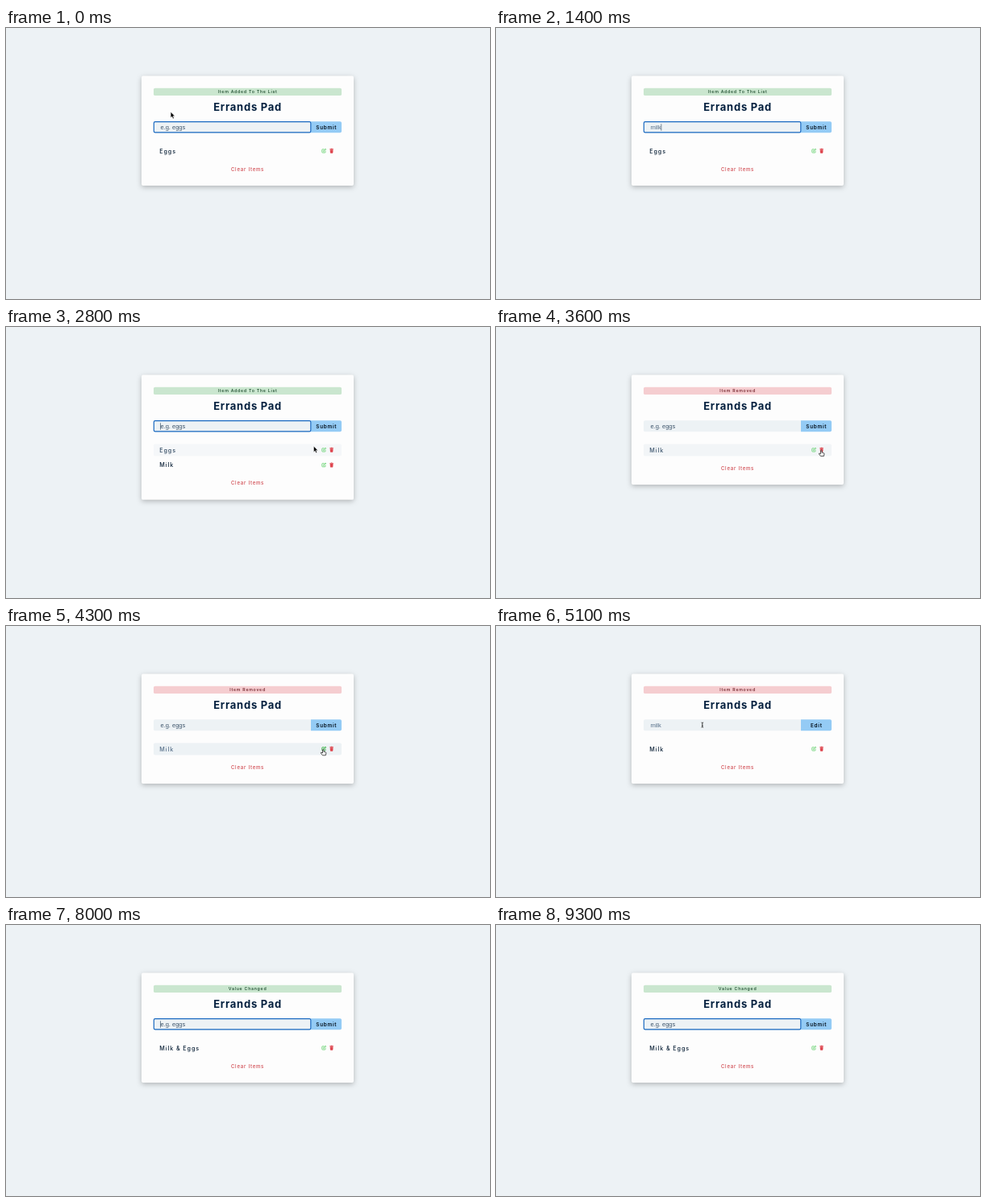
Animation, 600 px wide and 337 px high, one loop 9500 ms. Source, as an HTML page:

```html
<!DOCTYPE html>
<html lang="en">
<head>
<meta charset="utf-8">
<title>Shopping list</title>
<style>
  html, body { margin: 0; width: 100%; height: 100%; overflow: hidden; background: #edf2f5; }
  svg { display: block; width: 600px; height: 337px; }
  text { font-family: Inter, sans-serif; letter-spacing: .75px; white-space: pre; }
  .center { text-anchor: middle; }
  #card { fill: #fdfdfd; filter: drop-shadow(0 2px 3px rgba(0, 0, 0, .25)); }
  #alert { font-size: 5.25px; font-weight: 500; letter-spacing: .73px; }
  #heading { font-size: 13px; font-weight: 700; fill: #04203f; }
  #value { font: 7.5px "Liberation Sans", Arial, sans-serif; letter-spacing: 0; }
  #button { font-size: 6.35px; font-weight: 600; fill: #04101c; }
  #clear { font-size: 6.05px; font-weight: 500; fill: #d0484f; }
  .item { font-size: 7.2px; font-weight: 500; letter-spacing: .92px; }
  .edit { fill: none; stroke: #6fd478; stroke-width: .9; }
  .trash { fill: #de464f; }
  .arrow { fill: #000; stroke: #fff; stroke-width: .4; }
  .hand { fill: #fff; stroke: #111; stroke-width: .7; stroke-linejoin: round; }
  .beam { fill: none; stroke: #222; stroke-width: .8; }
</style>
</head>
<body>
<svg viewBox="0 0 600 337">
  <defs>
    <path id="trashIcon" d="M401.3 150.3h1.3l.4-.5h1.2l.4.5h1.3v.7h-4.6zM401.6 151.3h4l-.3 3.8q-.1.6-.6.6h-2.2q-.5 0-.6-.6z"/>
    <path id="editIcon" d="M394.3 150.8h-1.9q-.6 0-.6.6v3q0 .6.6.6h3q.6 0 .6-.6v-1.2M393.5 153.4l.2-1 2.3-2.2.8.8-2.3 2.2z"/>
  </defs>
  <rect id="card" x="168" y="59.5" width="263" rx="1.9"/>
  <rect id="alertBox" x="183" y="74.7" width="233" height="9.4" rx="1.9"/>
  <text id="alert" class="center" x="299.6" y="81.3"></text>
  <text id="heading" class="center" x="299.6" y="103.1">Errands Pad</text>
  <path d="M378 116.2H184.9a1.9 1.9 0 0 0-1.9 1.9V128.3a1.9 1.9 0 0 0 1.9 1.9H378z" fill="#edf2f5"/>
  <path d="M378 116.2h36.1a1.9 1.9 0 0 1 1.9 1.9V128.3a1.9 1.9 0 0 1-1.9 1.9H378z" fill="#94cbf5"/>
  <rect id="ring" x="183.3" y="116.6" width="194.5" height="13.2" rx="1.6" fill="none" stroke="#1667c0" stroke-width="1.15"/>
  <text id="value" x="191.4" y="125.7"></text>
  <rect id="caret" y="119.3" width=".7" height="8.4" fill="#3f566c"/>
  <text id="button" class="center" x="397.3" y="125.5"></text>
  <g>
    <rect id="rowBack" x="183" y="145.4" width="233" height="15" rx="1.9" fill="#edf2f5"/>
    <text id="item" class="item" x="190.2" y="155.7"></text>
    <use id="editButton" class="edit" href="#editIcon"/>
    <use class="trash" href="#trashIcon"/>
  </g>
  <g id="secondRow" transform="translate(0 18.8)">
    <text class="item" x="190.2" y="155.7" fill="#0c2238">Milk</text>
    <use class="edit" href="#editIcon"/>
    <use class="trash" href="#trashIcon"/>
  </g>
  <text id="clear" class="center" x="299.5">Clear Items</text>
  <g id="pointer">
    <path class="arrow" d="M0 0v7.2l1.6-1.5 1.2 2.7 1.2-.5-1.2-2.7h2.2z"/>
    <path class="hand" d="M-.7.6Q0-.4.7.6V3l2 .5q1 .3.9 1.4L3.1 7.6H-.8L-2.8 5q-.4-1 .6-1l1.5.8z"/>
    <path class="beam" d="M-1.3-3Q0-3 0-2.2V2.2Q0 3-1.3 3M1.3-3Q0-3 0-2.2M0 2.2Q0 3 1.3 3M-.8.8H.8"/>
  </g>
</svg>
<script>
const LOOP = 9500;
const ADDED = 1600, REMOVED = 3400, EDITING = 4400, FOCUSED = 5200, SAVED = 8000;

// Contents of the field: [time, text]
const typing = [
  [0, ''], [600, 'm'], [800, 'mi'], [1000, 'mil'], [1400, 'milk'], [ADDED, ''],
  [EDITING, 'milk'], [6000, 'milk '], [6500, 'milk &'], [6600, 'milk & '],
  [7200, 'milk & e'], [7500, 'milk & eg'], [7600, 'milk & egg'], [7800, 'milk & eggs'], [SAVED, '']
];
// Moments that restart the caret blink
const blinkStarts = [-600, 600, 800, 1000, 1400, FOCUSED, 6000, 6500, 6600, 7200, 7500, 7600, 7800];
// Pointer stops: [time, x, y]
const stops = [
  [0, 204.2, 104.4], [2350, 204.2, 104.4], [2800, 381.5, 148.2], [3200, 403.3, 153],
  [3700, 403.3, 153], [4150, 393.2, 153.2], [4550, 393.2, 153.2], [5100, 255.8, 123], [LOOP, 255.8, 123]
];

const $ = id => document.getElementById(id);
const set = (id, attrs) => Object.entries(attrs).forEach(([k, v]) => $(id).setAttribute(k, v));
const show = (node, on) => { node.style.display = on ? '' : 'none'; };
const write = (id, text) => { if ($(id).textContent !== text) $(id).textContent = text; };
const within = (v, a, b) => v >= a && v < b;
const ramp = (t, start) => Math.min(1, Math.max(0, (t - start) / 300));
const mix = (a, b, k) => `rgb(${a.map((v, i) => Math.round(v + (b[i] - v) * k))})`;

function pointerAt(t) {
  const i = stops.findIndex(s => s[0] > t);
  const [t0, x0, y0] = stops[i - 1], [t1, x1, y1] = stops[i];
  const p = (t - t0) / (t1 - t0), k = p * p * (3 - 2 * p);
  return [x0 + (x1 - x0) * k, y0 + (y1 - y0) * k];
}

function drawPointer(t) {
  const [x, y] = pointerAt(t);
  const onRow = within(y, 145.4, 160.4);
  const onEdit = onRow && within(x, 390, 398);
  const onIcon = onEdit || onRow && within(x, 400.5, 407);
  const onField = within(x, 183, 378) && within(y, 116, 130.5);
  const shape = onIcon ? 1 : onField ? 2 : 0;
  [...$('pointer').children].forEach((node, i) => show(node, i === shape));
  show($('pointer'), t < 600 || within(t, 2400, 6000));
  set('pointer', { transform: `translate(${x} ${y})` });
  $('editButton').style.stroke = onEdit && t > REMOVED ? '#2fae3c' : '';
}

function drawField(t) {
  const text = typing.findLast(step => step[0] <= t)[1];
  const focused = t < REMOVED || t >= FOCUSED;
  const blink = Math.floor((t - blinkStarts.findLast(s => s <= t)) / 500);
  write('value', text || 'e.g. eggs');
  set('value', { fill: text ? '#566f89' : '#3f566c' });
  show($('ring'), focused);
  show($('caret'), focused && blink % 2 === 0);
  set('caret', { x: 191.2 + (text ? $('value').getComputedTextLength() : 0) });
  write('button', within(t, EDITING, SAVED) ? 'Edit' : 'Submit');
}

function drawList(t) {
  const two = within(t, ADDED, REMOVED);
  const hover = t < REMOVED ? ramp(t, 2650) : ramp(t, REMOVED) - ramp(t, 4700);
  set('card', { height: two ? 155.3 : 136.5 });
  show($('secondRow'), two);
  set('clear', { y: two ? 196.4 : 177.6 });
  write('item', t < REMOVED ? 'Eggs' : t < SAVED ? 'Milk' : 'Milk & Eggs');
  set('item', { fill: mix([12, 34, 56], [86, 111, 137], hover) });
  set('rowBack', { opacity: hover });
}

function drawAlert(t) {
  const danger = within(t, REMOVED, SAVED);
  write('alert', danger ? 'Item Removed' : t < REMOVED ? 'Item Added To The List' : 'Value Changed');
  set('alert', { fill: danger ? '#6a1820' : '#154526' });
  set('alertBox', { fill: danger ? '#f5cdd0' : '#cae6cf' });
}

function render(now) {
  const t = Math.max(0, now) % LOOP;
  drawAlert(t);
  drawField(t);
  drawList(t);
  drawPointer(t);
  requestAnimationFrame(render);
}
render(performance.now());
</script>
</body>
</html>
```
